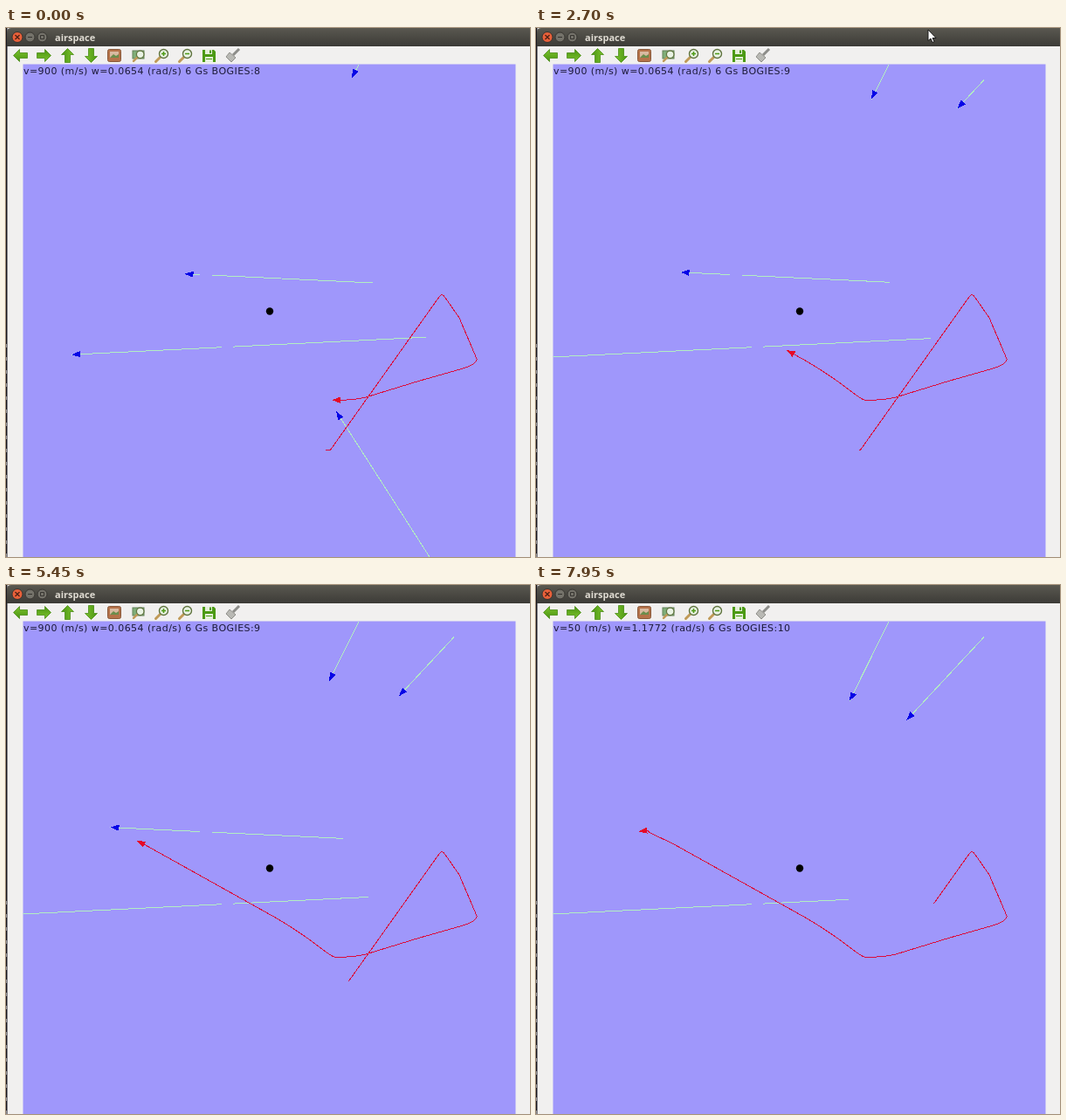
Animation, 600 px wide and 606 px high, one loop 8000 ms. Source, as an HTML page:

```html
<!DOCTYPE html>
<html lang="en">
<head>
<meta charset="utf-8">
<title>airspace</title>
<style>
  html, body { margin: 0; width: 100%; height: 100%; overflow: hidden; background: #f1f0ef; }
  svg { display: block; width: 600px; height: 606px; }
  .title { font: bold 11px "Open Sans", sans-serif; fill: #dfdbd2; }
  .status { font: 11px "DejaVu Sans", sans-serif; letter-spacing: .44px; fill: #1c1a38; }
  .trail { fill: none; stroke: #b2eec2; }
  .route { fill: none; stroke: #dc0a3c; }
  .bogie { fill: #0505e6; }
  .fighter { fill: #e60a28; }
  .sky { fill: #9f97fb; }
</style>
</head>
<body>
<svg viewBox="0 0 600 606">
  <defs>
    <linearGradient id="bar" x2="0" y2="1">
      <stop offset="0" stop-color="#5a5850"/><stop offset="1" stop-color="#3c3b37"/>
    </linearGradient>
    <linearGradient id="leaf" x2="0" y2="1">
      <stop offset="0" stop-color="#7cc32c"/><stop offset="1" stop-color="#4a9412"/>
    </linearGradient>
    <clipPath id="view"><rect x="19.5" y="41.5" width="564" height="565"/></clipPath>
    <path id="go" d="M-8 0L-1-7V-3H8V3H-1V7Z" fill="url(#leaf)" stroke="#4b8d18" stroke-width=".8"/>
    <g id="lens">
      <path d="M-2 2L-7 7" stroke="#c09a58" stroke-width="3" stroke-linecap="round"/>
      <circle cx="2" cy="-2" r="5" fill="#e9f2e4" stroke="#60743f" stroke-width="1.4"/>
    </g>
  </defs>

  <rect width="600" height="606" fill="#f1f0ef"/>
  <rect width="1.5" height="606" fill="#17151c"/>
  <path d="M.5 362V606" stroke="#8d8b90" stroke-dasharray="4 11"/>
  <path d="M1 21V5Q1 0 6 0H600V21Z" fill="url(#bar)"/>
  <circle cx="13" cy="10.5" r="6" fill="#e9603a" stroke="#35332f"/>
  <path d="M10.5 8l5 5m0-5l-5 5" stroke="#4d2014" stroke-width="1.3"/>
  <g fill="#74726a" stroke="#35332f">
    <circle cx="27.5" cy="10.5" r="5.5"/><circle cx="41.5" cy="10.5" r="5.5"/>
    <path d="M25 10.5h5M39.5 8.5h4v4h-4z" fill="none"/>
  </g>
  <text class="title" x="56" y="15">airspace</text>

  <use href="#go" transform="translate(16.5 31.5)"/>
  <use href="#go" transform="translate(43.5 31.5) rotate(180)"/>
  <use href="#go" transform="translate(70.5 31.5) rotate(90)"/>
  <use href="#go" transform="translate(97.5 31.5) rotate(-90)"/>
  <rect x="116.5" y="24.5" width="15" height="14" rx="2" fill="#b5734a" stroke="#8a5a3c"/>
  <path d="M119 27h10v7h-10z" fill="#d9b9a0"/>
  <path d="M119 34l4-4 3 2 3-2v4z" fill="#6b8d4c"/>
  <rect x="145" y="26" width="13" height="9" fill="#7fae78" stroke="#64815a"/>
  <use href="#lens" transform="translate(152 32) scale(.85)"/>
  <use href="#lens" transform="translate(178.5 31.5)"/>
  <path d="M178 29.5h5m-2.5-2.5v5" stroke="#4c9a14" stroke-width="1.5"/>
  <use href="#lens" transform="translate(205.5 31.5)"/>
  <path d="M205 29.5h5" stroke="#4c9a14" stroke-width="1.5"/>
  <path d="M225 25h13l2 2v12h-15z" fill="#4c9a14"/>
  <path d="M228 25h8v5h-8zM228 33h9v6h-9z" fill="#e4efd9"/>
  <path d="M233 25.5h2v3.5h-2zM229 35h7v1h-7z" fill="#4c9a14"/>
  <path d="M267 24l-7 7" stroke="#8d8d89" stroke-width="3"/>
  <path d="M256 28l7 6-5 5-6-6z" fill="#b9b9b4" stroke="#90908b"/>

  <rect class="sky" x="19.5" y="41.5" width="564" height="565"/>
  <g clip-path="url(#view)" shape-rendering="crispEdges">
    <path id="trails" class="trail"/>
    <path class="sky" d="M222 277h14v11h-14zM247 359h13v12h-13z"/>
    <path id="route" class="route" d="M366 483L371 484L496 308Q499 303 503 309L519 332L539 379Q540 385 520 391
      L474 404L412 423Q395 427 376 426Q372 425 362 417Q328 391 296 374L158 297L131 284L127 281"/>
    <path id="bogies" class="bogie"/>
    <path id="fighter" class="fighter"/>
  </g>
  <circle cx="302" cy="324.5" r="4.2"/>
  <text id="status" class="status" x="20" y="53"></text>
  <path id="cursor" d="M0 0V12.5L3 10L5 14.5L7 13.5L5 9.5H9Z" fill="#fff" stroke="#111" stroke-width=".9"/>
</svg>
<script>
const $ = id => document.getElementById(id);
const LOOP = 8000, STEP = 50;
// The fighter slows down to turn after each kill, then departs again.
const KILL_1 = 100, DEPART = 1040, KILL_2 = 5960;
const FAST = .057, SLOW = FAST / 18;

const route = $("route"), routeLength = route.getTotalLength();

const ramp = (t, from, to) => Math.min(1, Math.max(0, (t - from) / (to - from)));
const isFast = t => t < KILL_1 || (t >= DEPART && t < KILL_2);

function distance(t) {
  const fastTime = Math.min(t, KILL_1) + (KILL_2 - DEPART) * ramp(t, DEPART, KILL_2);
  return FAST * fastTime + SLOW * (t - fastTime);
}

const pt = p => p.map(v => v.toFixed(2)).join(" ");
const line = points => "M" + points.map(pt).join("L");

function arrow([x, y], dx, dy) {
  const n = Math.hypot(dx, dy), ux = dx / n, uy = dy / n;
  const bx = x - ux * 10, by = y - uy * 10, half = 3.6;
  return line([[x, y], [bx - uy * half, by + ux * half], [bx + uy * half, by - ux * half]]) + "Z";
}

function drawBogies(t) {
  const travel = .0152 * t - 2.4 * Math.sin(2 * Math.PI * t / LOOP);
  const fade = .0105 * t + 41 * (t / LOOP) ** 4;
  let trails = "", bogies = "";
  const fly = (from, [x, y], dx, dy) => {
    const tip = [x + dx * travel, y + dy * travel];
    trails += line([from, tip]);
    bogies += arrow(tip, dx, dy);
  };

  fly([404, 42], [396, 57], -.306, .628);
  fly([481 - fade, 354.2 + .0493 * fade], [75, 374.2], -2.1, .1035);
  if (t < KILL_1) fly([485, 606], [378, 439], -.63, -1);
  else fly([513, 59.5], [510, 62.5], -.709, .764);
  if (t < KILL_2) fly([420 - .52 * fade, 292 - .025 * fade], [204.5, 281.7], -1, -.048);

  $("trails").setAttribute("d", trails);
  $("bogies").setAttribute("d", bogies);
}

function drawFighter(t) {
  const head = routeLength - distance(LOOP) + distance(t);
  const tail = 154 * (t / LOOP) ** 3.4;
  route.setAttribute("stroke-dasharray", `${head - tail} 9999`);
  route.setAttribute("stroke-dashoffset", -tail);

  const degrees = 36 * ramp(t, KILL_1, 1000) - 8 * ramp(t, DEPART, 2700) - 37 * ramp(t, 6800, LOOP);
  const angle = degrees * Math.PI / 180;
  const dx = -Math.cos(angle), dy = -Math.sin(angle);
  const base = route.getPointAtLength(head);
  $("fighter").setAttribute("d", arrow([base.x + 10 * dx, base.y + 10 * dy], dx, dy));
}

function drawStatus(t) {
  const fast = isFast(t);
  const turn = fast ? "0.0654" : t < DEPART ? "-1.1772" : "1.1772";
  const count = 8 + (t >= KILL_1) + (t >= KILL_2);
  $("status").textContent = `v=${fast ? 900 : 50} (m/s) w=${turn} (rad/s) 6 Gs BOGIES:${count}`;
}

function drawCursor(t) {
  const up = ramp(t, 2400, 2550), across = ramp(t, 2550, 2700);
  $("cursor").setAttribute("transform", `translate(${560 + 14 * up - 125 * across} ${600 - 579 * up - 19 * across})`);
  $("cursor").setAttribute("visibility", t >= 2400 && t < 2750 ? "visible" : "hidden");
}

const start = performance.now();
function frame() {
  const elapsed = (performance.now() - start) % LOOP;
  const t = Math.floor(elapsed / STEP) * STEP;
  drawBogies(t);
  drawFighter(t);
  drawStatus(t);
  drawCursor(t);
  requestAnimationFrame(frame);
}
frame();
</script>
</body>
</html>
```
